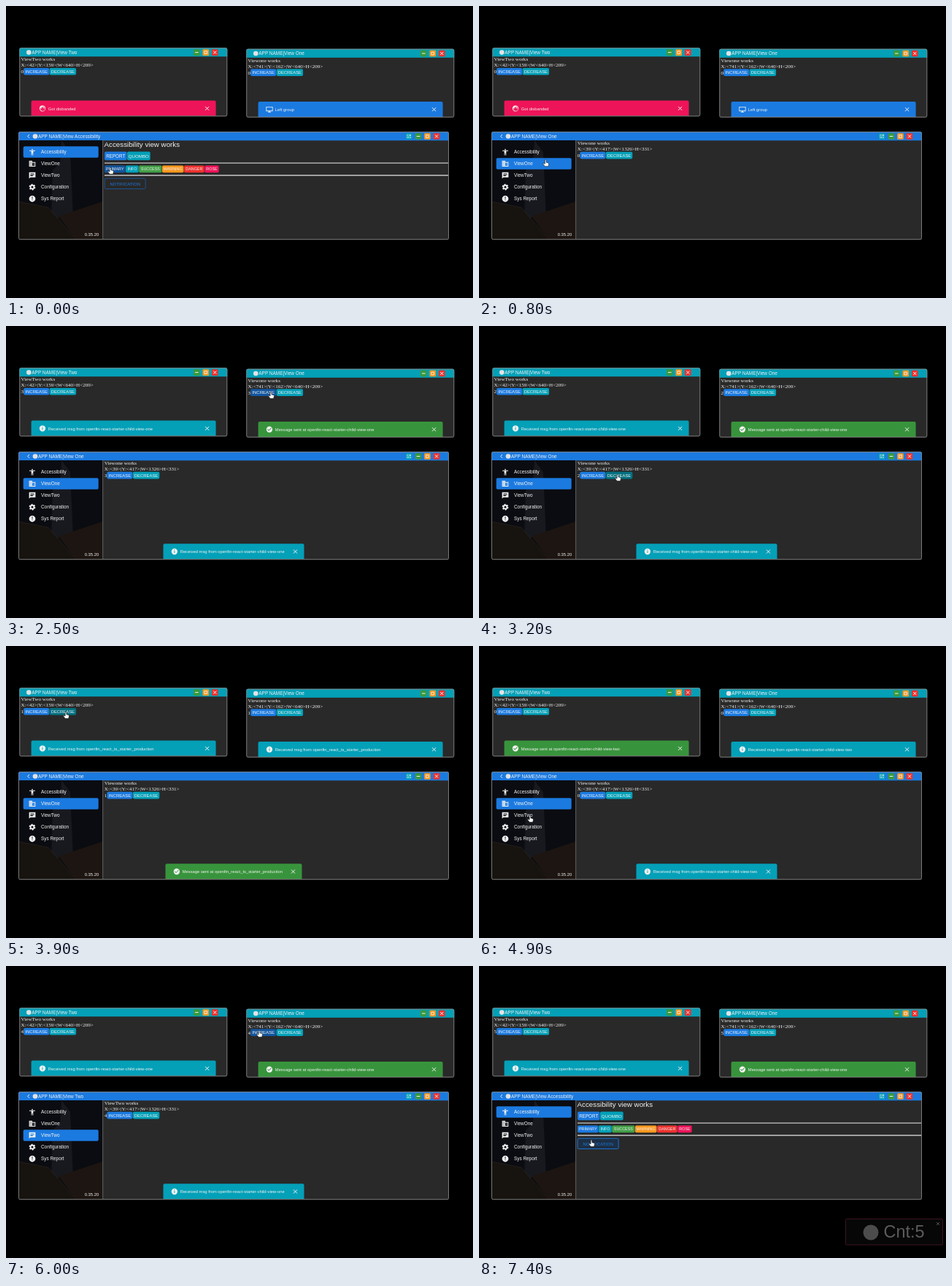
Animation of 640x400 px, one loop 7.5 s. Source, as an HTML page:

```html
<!DOCTYPE html>
<html lang="en">
<head>
<meta charset="utf-8">
<title>Linked windows</title>
<style>
  html, body { margin: 0; width: 100%; height: 100%; overflow: hidden; background: #000; }
  svg { display: block; font-family: "Liberation Sans", Arial, sans-serif; }
  .serif { font-family: "Liberation Serif", Times, serif; }
</style>
</head>
<body>
<svg id="stage" width="640" height="400" viewBox="0 0 640 400"></svg>
<script>
const LOOP = 7500, STEP = 100;
const BLUE = '#1b7ae0', TEAL = '#03a0b8', GREEN = '#38943c', ORANGE = '#fa981e',
      RED = '#ee322f', PINK = '#ee1459', BODY = '#292929', INK = '#f2f2f2';

const DISC = 'M12 2a10 10 0 1 0 0 20a10 10 0 1 0 0-20z';
const ICONS = {
  person: 'M12 2a2 2 0 1 0 0 4a2 2 0 1 0 0-4zM21 9h-6v13h-2v-6h-2v6H9V9H3V7h18z',
  business: 'M2 3h10v4h10v14H2zM4 5v2h2V5zm4 0v2h2V5zM4 9v2h2V9zm4 0v2h2V9zm-4 4v2h2v-2zm4 0v2h2v-2zm-4 4v2h2v-2zm4 0v2h2v-2zM12 9v10h8V9zm4 2h2v2h-2zm0 4h2v2h-2z',
  chat: 'M2 2h20v16H6l-4 4zM6 6v2h12V6zm0 3v2h12V9zm0 3v2h8v-2z',
  alert: DISC + 'm1 15h-2v-2h2zm0-4h-2V5h2z',
  info: DISC + 'm1 15h-2V9h2zm0-10h-2V5h2z',
  check: DISC + 'm-2 15l-5-5 1.4-1.4 3.6 3.6 7.6-7.6L19 8z',
  face: DISC + 'm0 3a7.5 7.5 0 0 1 7 5c-4 0-6-1-8-3c-1 2-3 4-6 5a7.5 7.5 0 1 0 7-7zM8 12h2v2H8zm6 0h2v2h-2z',
  screen: 'M1 3h22v15h-9v2h3v2H7v-2h3v-2H1zM3 5v11h18V5z',
  launch: 'M19 19H5V5h7V3H3v18h18v-9h-2zM14 3v2h3.6L8 14.6 9.4 16 19 6.4V10h2V3z'
};
const MENU = [['Accessibility', 'person'], ['ViewOne', 'business'], ['ViewTwo', 'chat'],
              ['Configuration', 'gear'], ['Sys Report', 'alert']];
const IDS = {
  main: 'openfin_react_ts_starter_production',
  one: 'openfin-react-starter-child-view-one',
  two: 'openfin-react-starter-child-view-two'
};
const TITLES = { Accessibility: 'View Accessibility', ViewOne: 'View One', ViewTwo: 'View Two' };

// [time, counter, window that was clicked]
const CLICKS = [[0, 0, ''], [1100, 1, 'main'], [1700, 2, 'two'], [2300, 3, 'one'], [2800, 2, 'one'],
  [3300, 1, 'main'], [4100, 0, 'two'], [5300, 1, 'main'], [5600, 2, 'two'],
  [5800, 3, 'one'], [5900, 4, 'one'], [6200, 5, 'one']];
const VIEWS = [[0, 'Accessibility'], [700, 'ViewOne'], [5000, 'ViewTwo'], [6700, 'Accessibility']];
// [time, x, y] of the pointer tip
const PATH = [[100, 143, 221], [300, 118, 219], [400, 118, 219], [600, 70, 213], [700, 70, 213],
  [1000, 152, 203], [1100, 152, 203], [1500, 44, 93], [1600, 42, 90], [1800, 42, 90],
  [2200, 362, 90], [2500, 363, 90], [2700, 388, 90], [2800, 388, 90], [3200, 190, 203],
  [3400, 190, 203], [3900, 82, 90], [4200, 82, 90], [4600, 72, 222], [4700, 72, 222],
  [4900, 70, 232], [5000, 70, 232], [5200, 152, 203], [5300, 152, 203], [5500, 42, 89],
  [5600, 42, 89], [5800, 347, 88], [6200, 347, 88], [6600, 68, 197], [6700, 68, 197],
  [7100, 154, 238], [7500, 154, 238]];

const latest = (list, t) => list.filter(e => e[0] <= t).pop();
let tip, hand;

function pointerAt(t) {
  const i = PATH.findIndex(p => p[0] > t);
  if (i < 1) return PATH[0].slice(1);
  const [t0, x0, y0] = PATH[i - 1], [t1, x1, y1] = PATH[i];
  const u = (t - t0) / (t1 - t0), k = u * u * (3 - 2 * u);
  return [x0 + (x1 - x0) * k, y0 + (y1 - y0) * k];
}
function hovered(x, y, w, h) {
  const hit = tip[0] >= x && tip[0] <= x + w && tip[1] >= y && tip[1] <= y + h - 2;
  hand = hand || hit;
  return hit;
}

const esc = s => String(s).replace(/</g, '&lt;').replace(/>/g, '&gt;');
const rect = (x, y, w, h, fill, r = 0, more = '') =>
  `<rect x="${x}" y="${y}" width="${w}" height="${h}" rx="${r}" fill="${fill}" ${more}/>`;
const text = (x, y, size, s, more = '') =>
  `<text x="${x}" y="${y}" font-size="${size}" fill="${INK}" ${more}>${esc(s)}</text>`;
const line = (d, color = INK, w = 1) =>
  `<path d="${d}" fill="none" stroke="${color}" stroke-width="${w}"/>`;
const dot = (x, y, r, fill) => `<circle cx="${x}" cy="${y}" r="${r}" fill="${fill}"/>`;
const cross = (x, y, r, w = 1, color = INK) =>
  line(`M${x - r} ${y - r}l${2 * r} ${2 * r}M${x + r} ${y - r}l${-2 * r} ${2 * r}`, color, w);

function icon(name, x, y, size) {
  const shape = name === 'gear'
    ? `<g fill="none" stroke="${INK}"><circle cx="12" cy="12" r="5.5" stroke-width="4"/>
       <circle cx="12" cy="12" r="8.5" stroke-width="3" stroke-dasharray="4.9 4"/></g>`
    : `<path d="${ICONS[name]}" fill="${INK}" fill-rule="evenodd"/>`;
  return `<g transform="translate(${x - size / 2} ${y - size / 2}) scale(${size / 24})">${shape}</g>`;
}

function button(x, y, w, h, label, size, color) {
  const shade = hovered(x, y, w, h) ? rect(x, y, w, h, '#000', 1.8, 'opacity=".3"') : '';
  return rect(x, y, w, h, color, 1.8) + shade +
    text(x + w / 2, y + h / 2 + size * .36, size, label, 'text-anchor="middle"');
}

function frame(x, y, w, h, color, title, titleX) {
  const cy = y + 6.3, right = x + w;
  const box = (cx, fill) => rect(cx - 4.3, cy - 4.3, 8.6, 8.6, fill, 1);
  return rect(x, y, w, h, BODY, 2) +
    `<path d="M${x} ${y + 12}v-10q0-2 2-2h${w - 4}q2 0 2 2v10z" fill="${color}"/>` +
    dot(titleX - 4, cy, 3.3, '#dfe3e6') + text(titleX, cy + 2.4, 6.45, title) +
    box(right - 42, '#3a9a3e') + line(`M${right - 44.3} ${cy}h4.6`) +
    box(right - 29.5, ORANGE) + line(`M${right - 31.3} ${cy - 1.8}h3.6v3.6h-3.6z`, INK, .9) +
    box(right - 17, RED) + cross(right - 17, cy, 2);
}
const border = (x, y, w, h) => rect(x + .5, y + .5, w - 1, h - 1, 'none', 2, 'stroke="#858585" stroke-width=".9"');

function counter(x, y, heading, size, n) {
  const serif = 'class="serif"';
  return text(x, y, 7.1, heading, serif) + text(x, y + 8, 7.1, size, serif) +
    text(x, y + 17, 7.1, n, serif) +
    button(x + 3.6, y + 9.8, 35, 9.6, 'INCREASE', 6, BLUE) +
    button(x + 39, y + 9.8, 36.5, 9.6, 'DECREASE', 5.9, TEAL);
}

function toast(x, y, w, color, symbol, message) {
  return `<path d="M${x} ${y + 21}v-19q0-2 2-2h${w - 4}q2 0 2 2v19z" fill="${color}"/>` +
    icon(symbol, x + 15.4, y + 10.8, 10) + text(x + 23.2, y + 13, 5.82, message) +
    cross(x + w - 12, y + 10.8, 2.5);
}
function messageToast(x, y, w, self, sender) {
  return self === sender
    ? toast(x, y, w, GREEN, 'check', 'Message sent at ' + IDS[sender])
    : toast(x, y, w, TEAL, 'info', 'Received msg from ' + IDS[sender]);
}

function child(x, y, self, title, heading, size, [, n, sender]) {
  const first = self === 'two' ? [PINK, 'face', 'Got disbanded'] : [BLUE, 'screen', 'Left group'];
  return frame(x, y, 285, 94, TEAL, 'APP NAME|' + title, x + 17) +
    counter(x + 2.3, y + 17.8, heading, size, n) +
    (sender ? messageToast(x + 16.3, y + 72.2, 253, self, sender) : toast(x + 16.3, y + 72.2, 253, ...first)) +
    border(x, y, 285, 94);
}

function sidebar(view) {
  const poly = (points, fill) => `<polygon points="${points}" fill="${fill}"/>`;
  return rect(17.5, 184, 115, 135.5, '#0b0c11') +
    poly('76,184 88,200 92,290 62,290 64,225 74,215', '#18191f') +
    poly('17,268 58,276 95,319 17,319', '#17130f') +
    poly('72,288 132,268 132,319 95,319', '#1d1511') +
    line('M17 268L58 276L95 319', '#2b241f', .7) +
    MENU.map(([label, symbol], i) => {
      const y = 200 + 16 * i;
      hovered(24, y - 7.5, 102.5, 17);
      return (label === view ? rect(23.7, y - 7.8, 103, 15.6, BLUE, 1.8) : '') +
        icon(symbol, 36, y, 10.5) + text(48, y + 2.3, 6.4, label);
    }).join('') +
    text(127.3, 315.2, 5.9, '0.35.20', 'text-anchor="end"') + line('M132.7 184V319.5', '#777', .8);
}

function accessibility() {
  const row = [['PRIMARY', 135, 28.5, BLUE], ['INFO', 164, 17.8, TEAL], ['SUCCESS', 182.2, 31.3, '#43a047'],
    ['WARNING', 214, 29.5, ORANGE], ['DANGER', 244, 27.7, RED], ['ROSE', 272.2, 19.5, PINK]];
  const lit = hovered(135, 236, 56.5, 14.5);
  return text(134.6, 193, 9.75, 'Accessibility view works') +
    button(135, 199.5, 30.5, 11.7, 'REPORT', 6.3, BLUE) +
    button(166, 199.5, 31.7, 11.7, 'QUOMBO', 6.2, TEAL) +
    line('M135 215.2H606M135 232H606', '#c8c8c8', 1.3) +
    row.map(([label, x, w, color]) => button(x, 218.6, w, 9.6, label, 5.4, color)).join('') +
    rect(135.2, 236.2, 56, 14.3, lit ? '#1d3046' : 'none', 1.8, `stroke="${lit ? BLUE : '#1d569a'}" stroke-width=".9"`) +
    `<text x="163.2" y="245.6" font-size="5.95" fill="${BLUE}" text-anchor="middle">NOTIFICATION</text>`;
}

function mainWindow([since, view], [clicked, n, sender]) {
  const left = sender === 'main' ? 218.5 : 215.5;
  const content = view === 'Accessibility' ? accessibility() :
    counter(134.8, 190, view === 'ViewOne' ? 'Viewone works' : 'ViewTwo works',
      'X:<39>|Y:<417>|W<1326>H<331>', n) +
    (clicked > since ? messageToast(left, 298.2, 2 * (312 - left), 'main', sender) : '');
  return frame(17, 172.2, 590, 148, BLUE, 'APP NAME|' + TITLES[view], 44) +
    line('M32 176l-2.3 2.4l2.3 2.4') + rect(547.9, 174.2, 8.6, 8.6, TEAL, 1) +
    icon('launch', 552.2, 178.5, 6.8) + sidebar(view) + content + border(17, 172.2, 590, 148);
}

function notice(n, opacity) {
  return `<g opacity="${opacity}">` +
    rect(502.5, 346.5, 133, 35.5, '#070707', 1, 'stroke="#3c1420"') +
    dot(537, 365, 10.5, '#4c4c4c') +
    `<text x="554.5" y="372" font-size="23.4" fill="#5c5c5c">Cnt:${n}</text>` +
    cross(629, 353, 2, .8, '#666') + '</g>';
}

function pointer() {
  const shape = hand
    ? 'M-.9 .8Q0-.6 .9 .8V3.8L3.6 4.5Q4.6 5 4.4 6.4L3.7 9.3H-1L-3.3 6Q-3.4 4.5-1.9 5.2L-.9 6z'
    : 'M0 0V8L1.9 6.3L3.2 9.2L4.5 8.6L3.2 5.8H5.7z';
  return `<path transform="translate(${tip})" d="${shape}" fill="#fff" stroke="#111" stroke-width=".6"/>`;
}

function draw(t) {
  tip = pointerAt(t);
  hand = false;
  const click = latest(CLICKS, t);
  document.getElementById('stage').innerHTML =
    child(18.3, 57.3, 'two', 'View Two', 'ViewTwo works', 'X:<42>|Y:<159>|W<640>H<209>', click) +
    child(329.3, 58.7, 'one', 'View One', 'Viewone works', 'X:<741>|Y:<162>|W<640>H<209>', click) +
    mainWindow(latest(VIEWS, t), click) +
    (t >= 7300 ? notice(click[1], t >= 7400 ? 1 : .4) : '') + pointer();
}

let shown = -1;
function tick() {
  const t = Math.floor(performance.now() % LOOP / STEP) * STEP;
  if (t !== shown) draw(shown = t);
  requestAnimationFrame(tick);
}
tick();
</script>
</body>
</html>
```
